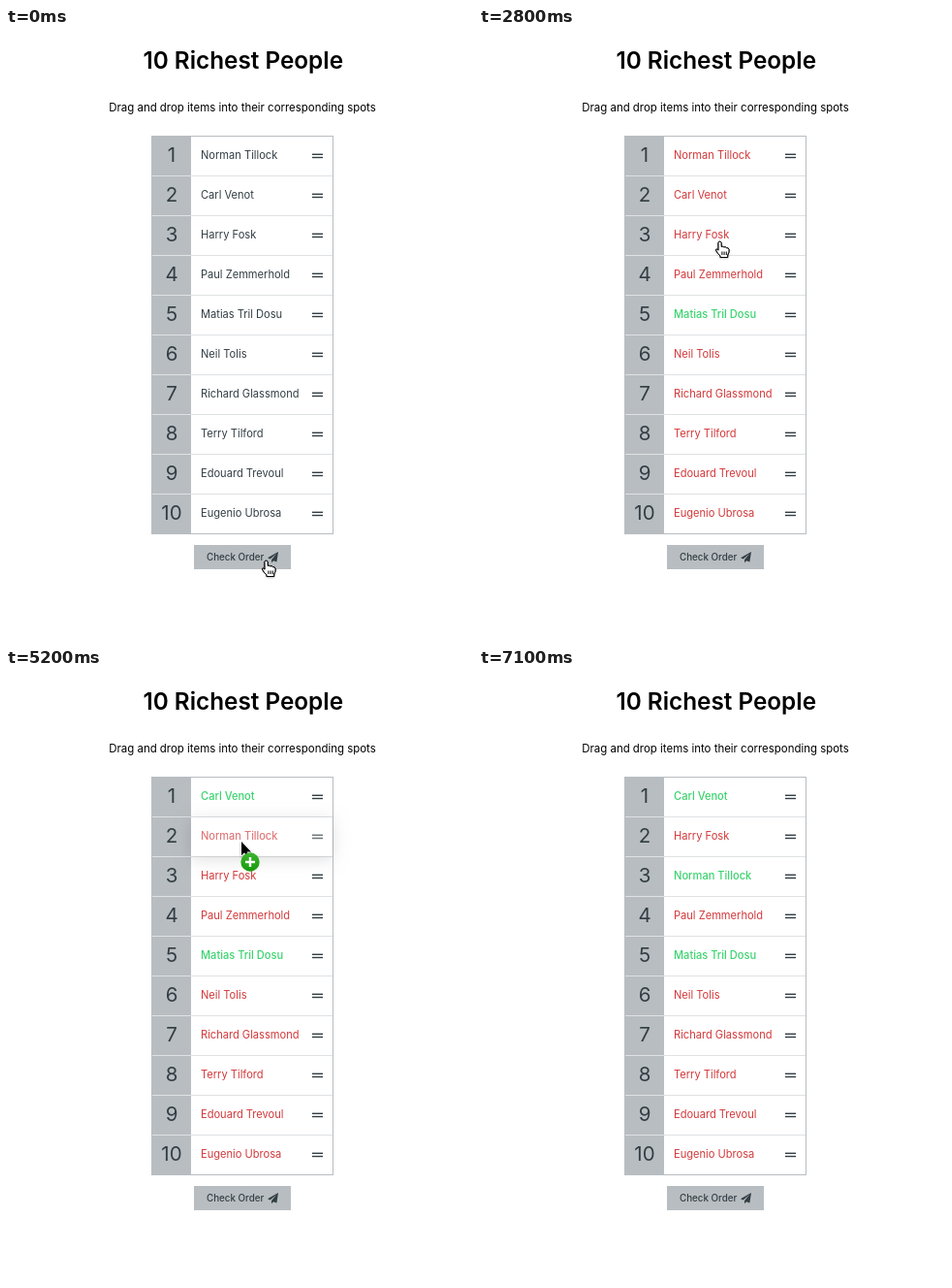
An HTML page with a canvas that plays this animation: 482x632 px, repeating every 7.2 s.

```html
<!DOCTYPE html>
<html lang="en">
<head>
<meta charset="utf-8">
<title>10 Richest People</title>
<style>
  html, body { margin: 0; width: 100%; height: 100%; overflow: hidden; background: #fff; }
  canvas { display: block; width: 482px; height: 632px; }
</style>
</head>
<body>
<canvas id="stage"></canvas>
<script>
const W = 482, H = 632, LOOP = 7200, STEP = 100;
const FONT = 'Inter, "Open Sans", sans-serif';
const INK = '#323e44', GREY = '#b8bdc1', LINE = '#dfe1e3';
const RED = '#d2383a', GREEN = '#3ad36e';
const LEFT = 150, TOP = 112, ROW = 41, CELL = 191, RIGHT = 337;

const canvas = document.getElementById('stage');
const ratio = window.devicePixelRatio || 1;
canvas.width = W * ratio;
canvas.height = H * ratio;
const ctx = canvas.getContext('2d');

// Each person with the row they belong in.
const people = [
  ['Norman Tillock', 3], ['Carl Venot', 1], ['Harry Fosk', 10],
  ['Paul Zemmerhold', 8], ['Matias Tril Dosu', 5], ['Neil Tolis', 2],
  ['Richard Glassmond', 9], ['Terry Tilford', 7], ['Edouard Trevoul', 4],
  ['Eugenio Ubrosa', 6]
].map(([name, rank]) => ({ name, rank }));

const PRESS = 1400, CHECK = 1600, LEAVE = 6800;
const drags = [
  { start: 3800, drop: 4300, from: 1, to: 0, x: 245, y: 171 },
  { start: 5200, drop: 5900, from: 1, to: 2, x: 243, y: 178 }
];

// Pointer path: time, x, y
const path = [
  [0, 268.5, 549], [1900, 268.5, 549], [2100, 266, 526], [2800, 248.5, 220],
  [3200, 247, 180], [3700, 245, 171], [3800, 247, 154], [4300, 248, 141],
  [4600, 248, 141], [5200, 243, 178], [5600, 241, 208], [5900, 241, 214],
  [6200, 241, 216], [6700, 262, 525], [7200, 262, 525]
];

const arrow = new Path2D('M0 0V14.2L3.2 11.2L5.6 16.6L8 15.6L5.7 10.4H10Z');
const hand = new Path2D(
  'M-1.5 1.5Q-1.5 .2 0 .2Q1.5 .2 1.5 1.5L1.7 5.6Q3 4.8 4.3 6Q5.8 5.2 6.9 6.7' +
  'Q9.4 6.4 9.6 8.8Q9.8 11.5 8.2 14V16.5H.6V15Q-2.4 12.3 -4.1 9Q-3.8 7 -1.4 9.2Z');
const knuckles = new Path2D('M2.4 10.5V14M4.6 10.5V14M6.8 10.5V14');
const plane = new Path2D('M11 0L0 6.2L2.6 7.4L9.2 1.9L4 8.3V11.2L6 9.2L9.4 10.4Z');

function text(str, x, y, size, color = INK, weight = 400, align = 'left') {
  ctx.font = `${weight} ${size}px ${FONT}`;
  ctx.textAlign = align;
  ctx.fillStyle = color;
  ctx.fillText(str, x, y);
}

function box(x, y, w, h, color) {
  ctx.fillStyle = color;
  ctx.fillRect(x, y, w, h);
}

function pointerAt(t) {
  const i = path.findIndex((p, n) => n > 0 && t <= p[0]);
  const [t0, x0, y0] = path[i - 1], [t1, x1, y1] = path[i];
  const u = (t - t0) / (t1 - t0), k = u * u * (3 - 2 * u);
  return { x: x0 + (x1 - x0) * k, y: y0 + (y1 - y0) * k };
}

function orderAt(t) {
  const order = people.slice();
  for (const d of drags) {
    if (t >= d.drop) [order[d.from], order[d.to]] = [order[d.to], order[d.from]];
  }
  return order;
}

function item(person, row, t) {
  const y = TOP + row * ROW;
  const right = t >= CHECK && person.rank === row + 1;
  const color = t < CHECK ? INK : right ? GREEN : RED;
  text(person.name, 201, y + 23.3, 11.1, color, right ? 500 : 400);
  box(316, y + 17.6, 11, 1.4, INK);
  box(316, y + 20.8, 11, 1.4, INK);
}

function list(order, t) {
  box(LEFT, TOP - 1, 188, 411, GREY);
  box(CELL, TOP, RIGHT - CELL, 409, '#fff');
  order.forEach((person, i) => {
    const y = TOP + i * ROW;
    if (i) box(LEFT + 1, y - 1, RIGHT - LEFT - 1, 1, LINE);
    text(i + 1, 171, y + 26.2, 20.5, INK, 400, 'center');
    item(person, i, t);
  });
}

function button(pressed) {
  ctx.save();
  if (pressed) {
    ctx.translate(244.5, 546);
    ctx.scale(0.98, 0.98);
    ctx.translate(-244, -545.5);
  }
  box(194, 533, 100, 25, GREY);
  text('Check Order', 207, 549, 9.8, INK, 500);
  ctx.translate(270, 540);
  ctx.fillStyle = INK;
  ctx.fill(plane);
  ctx.restore();
}

// The shadow stays outside the card so the see-through card keeps white.
function card(x, y, w, h) {
  ctx.save();
  ctx.beginPath();
  ctx.rect(x - 30, y - 30, w + 60, h + 60);
  ctx.rect(x, y, w, h);
  ctx.clip('evenodd');
  ctx.shadowColor = 'rgba(0,0,0,.25)';
  ctx.shadowBlur = 16 * ratio;
  ctx.shadowOffsetY = 3 * ratio;
  box(x, y, w, h, '#fff');
  ctx.restore();
  box(x, y, w, h, '#fff');
}

function ghost(drag, order, p, t) {
  ctx.save();
  ctx.globalAlpha = t === drag.start ? 0.5 : 0.86;
  ctx.translate(p.x - drag.x, p.y - drag.y);
  card(CELL, TOP + drag.from * ROW, RIGHT - CELL, 40);
  ctx.globalAlpha *= 0.85;
  item(order[drag.from], drag.from, t);
  ctx.restore();
}

function badge(x, y) {
  const fill = ctx.createLinearGradient(0, y - 10, 0, y + 10);
  fill.addColorStop(0, '#3fb52f');
  fill.addColorStop(1, '#159a0c');
  ctx.beginPath();
  ctx.arc(x, y, 9.7, 0, Math.PI * 2);
  ctx.fillStyle = fill;
  ctx.fill();
  box(x - 5, y - 1.2, 10, 2.4, '#fff');
  box(x - 1.2, y - 5, 2.4, 10, '#fff');
}

function pointer(p, isArrow) {
  const shape = isArrow ? arrow : hand;
  ctx.save();
  ctx.translate(p.x, p.y);
  ctx.lineJoin = 'round';
  ctx.shadowColor = 'rgba(0,0,0,.3)';
  ctx.shadowBlur = 2 * ratio;
  ctx.shadowOffsetY = ratio;
  ctx.fillStyle = isArrow ? '#000' : '#fff';
  ctx.strokeStyle = isArrow ? '#fff' : '#000';
  ctx.lineWidth = isArrow ? 2 : 1;
  ctx.stroke(shape);
  ctx.shadowColor = 'transparent';
  ctx.fill(shape);
  if (!isArrow) {
    ctx.stroke(shape);
    ctx.stroke(knuckles);
  }
  ctx.restore();
}

function draw(t) {
  const p = pointerAt(t), order = orderAt(t);
  const drag = drags.find(d => t >= d.start && t < d.drop);
  const isArrow = drags.some(d => t >= d.start && t < d.drop + 300);

  ctx.setTransform(ratio, 0, 0, ratio, 0, 0);
  box(0, 0, W, H, '#fff');
  text('10 Richest People', 244.7, 41.7, 24.3, '#000', 600, 'center');
  text('Drag and drop items into their corresponding spots', 244, 86.2, 11.45, '#000', 400, 'center');
  list(order, t);
  button(t >= PRESS && t < CHECK);
  if (drag) ghost(drag, order, p, t);
  if (t < LEAVE) pointer(p, isArrow);
  if (drag) badge(p.x + 9, p.y + 21);
}

const begin = performance.now();
function tick() {
  const t = (performance.now() - begin) % LOOP;
  draw(Math.floor(t / STEP) * STEP);
  requestAnimationFrame(tick);
}
tick();
</script>
</body>
</html>
```
